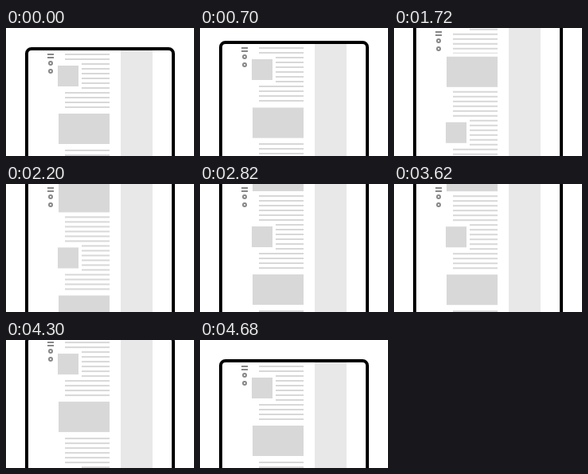
Animation of 236x160 px, one loop 4.92 s. Source, as an HTML page:

```html
<!DOCTYPE html>
<html lang="en">
<head>
<meta charset="utf-8">
<title>Scrolling page</title>
<style>
  html, body { margin: 0; height: 100%; overflow: hidden; background: #fff; }
  svg { display: block; width: 100vw; height: 100vh; }
</style>
</head>
<body>
<svg viewBox="0 0 236 160">
  <g id="page">
    <rect x="144" y="26" width="40" height="400" fill="#e8e8e8"/>
    <g id="text" fill="#d8d8d8"></g>
    <g id="firstImage"></g>
    <g id="secondImage"></g>
    <rect x="26" y="26" width="184" height="400" rx="6" fill="none" stroke="#000" stroke-width="4"/>
  </g>
  <g id="icons" fill="none" stroke="#888" stroke-width="2">
    <path d="M52 33h8M52 37h8"/>
    <circle cx="56" cy="44" r="2"/>
    <circle cx="56" cy="54" r="2"/>
  </g>
</svg>
<script>
const LOOP = 4920, STEP = 20, PERIOD = 144, HEADER = 30, BODY = 108;
const [page, text, firstImage, secondImage, icons] =
  ['page', 'text', 'firstImage', 'secondImage', 'icons'].map(id => document.getElementById(id));

function addRect(parent, x, y, width, height, fill) {
  const rect = document.createElementNS('http://www.w3.org/2000/svg', 'rect');
  Object.entries({ x, y, width, height }).forEach(([k, v]) => rect.setAttribute(k, v));
  if (fill) rect.setAttribute('fill', fill);
  parent.append(rect);
}

function addImage(parent, y) {
  addRect(parent, 65, y - 4, 66, 46, '#fff');
  addRect(parent, 66, y, 64, 38, '#d8d8d8');
}

// Text lines, indented beside the small square pictures
for (let i = 0; i < 46; i++) {
  const row = i % 24;
  const x = row > 1 && row < 8 ? 95 : 74;
  addRect(text, x, 32 + i * 6, 130 - x, 2);
}
for (const y of [47, 47 + PERIOD]) addRect(text, 65, y, 26, 26);
addImage(firstImage, 107);
addImage(secondImage, 107 + PERIOD);

const progress = (t, start, length) => Math.min(1, Math.max(0, (t - start) / length));
const sine = p => (1 - Math.cos(Math.PI * p)) / 2;

// Speeds up, runs evenly, slows down; returns 0 to 1
function glide(t, start, length, up, down) {
  const s = progress(t, start, length) * length;
  const speed = 1 / (length - (up + down) / 2);
  if (s < up) return speed * s * s / (2 * up);
  if (s > length - down) return 1 - speed * (length - s) ** 2 / (2 * down);
  return speed * (s - up / 2);
}

const moveY = (el, y) => el.setAttribute('transform', `translate(0 ${y.toFixed(3)})`);

function draw(now) {
  const t = Math.floor(now % LOOP / STEP) * STEP;
  const enter = sine(progress(t, 420, 810));
  const down = HEADER * enter + BODY * glide(t, 1100, 1720, 160, 580);
  const scroll = down - (HEADER + BODY) * glide(t, 3600, 1080, 180, 430);
  const release = sine(progress(t, 3600, 300));

  moveY(page, -scroll);
  moveY(firstImage, 2 * (enter - release));
  moveY(icons, 2 * (sine(progress(t, 1180, 300)) - release) - Math.min(scroll, HEADER));
}

const begin = performance.now();
function tick() {
  draw(performance.now() - begin);
  requestAnimationFrame(tick);
}
tick();
</script>
</body>
</html>
```
